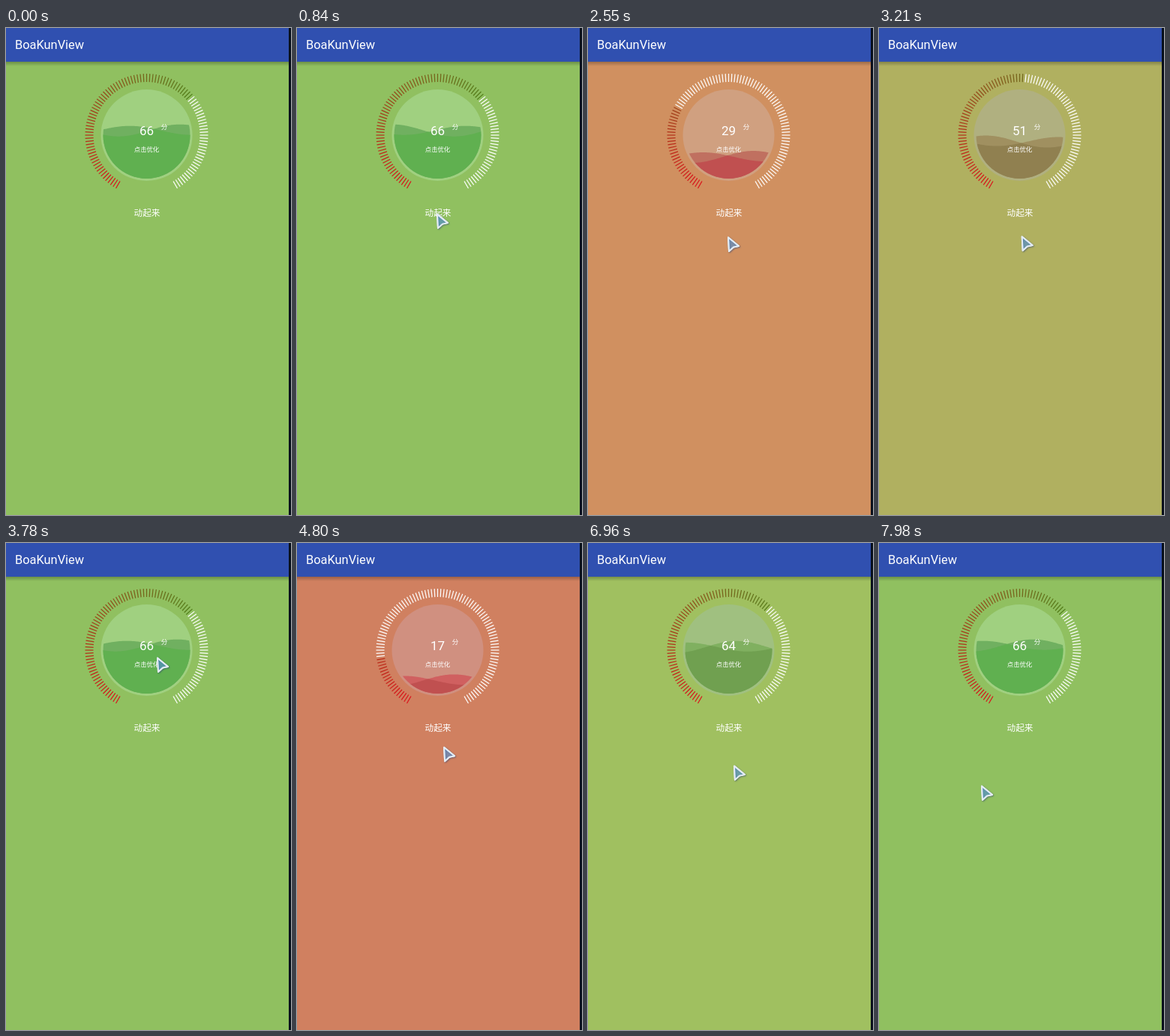
An HTML page with a canvas for the animation above (8 s loop, 380 by 650 pixels).

```html
<!DOCTYPE html>
<html lang="zh">
<head>
<meta charset="utf-8">
<style>
html, body { margin: 0; width: 100%; height: 100%; overflow: hidden; }
canvas { display: block; }
</style>
</head>
<body>
<canvas id="stage" width="380" height="650"></canvas>
<script>
const ctx = document.getElementById('stage').getContext('2d');
const LOOP = 8000, CX = 187.5, CY = 143, FULL = 200 / 3;
const FALL = 720, RISE = 30.6 * FULL, BOTTOMS = [1650, 4990];
const WAVE_LENGTH = 164;

// [time, x, y] of the pointer tip
const POINTER = [
  [30, 50, 200], [510, 186, 247], [840, 186, 247], [1470, 167, 332],
  [1620, 165, 384], [2430, 184, 289], [2550, 186, 278], [3270, 190, 277],
  [3780, 201, 152], [4290, 201, 152], [5070, 192, 334], [5910, 192, 334],
  [6660, 193, 300], [6960, 194, 296], [7200, 175, 328], [7440, 146, 321],
  [7770, 146, 321], [7980, 136, 323]
];
// [time, wave steps]
const WAVE_STEPS = [[0, 0], [1470, 7], [3780, 19], [5610, 31], [7980, 45]];

function track(keys, t, axis) {
  const i = keys.findIndex(k => k[0] >= t);
  if (i < 0) return keys[keys.length - 1][axis];
  if (i === 0) return keys[0][axis];
  const a = keys[i - 1], b = keys[i];
  return a[axis] + (b[axis] - a[axis]) * (t - a[0]) / (b[0] - a[0]);
}

function scoreAt(t) {
  for (const zero of BOTTOMS) {
    const d = t - zero;
    if (d >= -FALL && d < 0) return -d / FALL * FULL;
    if (d >= 0 && d < RISE) return d / RISE * FULL;
  }
  return FULL;
}

const mix = (a, b, k) => a.map((v, i) => v + (b[i] - v) * k);
// colours move in coarse steps of 16
const css = c => `rgb(${c.map(v => Math.floor(v / 16) * 16)})`;

function palette(score) {
  const red = 255 * (1 - score / 100), green = 255 * score / 100;
  const back = mix([255, 255, 255], [red, green, 0], 0.588);
  const disc = [
    back[0] + (255 - back[0]) * 0.05,
    back[1] + (255 - back[1]) * 0.15,
    134
  ];
  const water = [red, green - 8, 64];
  const single = mix(disc, water, 0.45);
  return { back, disc, single, both: mix(single, water, 0.45) };
}

function circle(r) {
  ctx.beginPath();
  ctx.arc(CX, CY, r, 0, 2 * Math.PI);
}

function text(str, x, y, size, family, align = 'center') {
  ctx.font = `${size}px ${family}, sans-serif`;
  ctx.textAlign = align;
  ctx.fillStyle = '#fff';
  ctx.fillText(str, x, y);
}

function fillBelow(surface, colour) {
  ctx.beginPath();
  ctx.moveTo(125, 210);
  for (let x = 125; x <= 250; x++) ctx.lineTo(x, surface(x));
  ctx.lineTo(250, 210);
  ctx.fillStyle = css(colour);
  ctx.fill();
}

function drawWater(t, score, colours) {
  const level = 200 - 0.95 * score;
  const steps = Math.floor(track(WAVE_STEPS, t, 1) + 0.4);
  const wave = (height, crest) => x =>
    level - height * Math.cos((x - crest) * 2 * Math.PI / WAVE_LENGTH + steps);
  const a = wave(6, 165), b = wave(8, 232);
  ctx.save();
  circle(58);
  ctx.clip();
  fillBelow(x => Math.min(a(x), b(x)), colours.single);
  fillBelow(x => Math.max(a(x), b(x)), colours.both);
  ctx.restore();
}

function drawTicks(score) {
  ctx.lineWidth = 1.2;
  for (let i = 0; i <= 100; i++) {
    const p = i / 100, angle = (120 + 3 * i) * Math.PI / 180;
    const c = Math.cos(angle), s = Math.sin(angle);
    ctx.strokeStyle = i <= score
      ? `rgb(${220 - 210 * p}, ${16 + 165 * p}, 25)` : '#fff';
    ctx.beginPath();
    ctx.moveTo(CX + 71 * c, CY + 71 * s);
    ctx.lineTo(CX + 82 * c, CY + 82 * s);
    ctx.stroke();
  }
}

function drawPointer(x, y) {
  ctx.save();
  ctx.translate(x, y);
  ctx.beginPath();
  ctx.moveTo(1, 1.5);
  ctx.lineTo(15, 13);
  ctx.lineTo(8, 14.5);
  ctx.lineTo(2, 20);
  ctx.closePath();
  ctx.lineJoin = 'round';
  ctx.lineWidth = 2;
  ctx.strokeStyle = '#e4ecf4';
  ctx.shadowColor = 'rgba(40, 60, 110, 0.6)';
  ctx.shadowBlur = 2;
  ctx.shadowOffsetX = ctx.shadowOffsetY = 1;
  ctx.stroke();
  ctx.shadowColor = 'transparent';
  ctx.fillStyle = 'rgba(80, 140, 205, 0.65)';
  ctx.fill();
  ctx.stroke();
  ctx.restore();
}

function drawHeader() {
  ctx.fillStyle = '#3050b0';
  ctx.fillRect(0, 0, 377, 45);
  const shade = ctx.createLinearGradient(0, 45, 0, 51);
  shade.addColorStop(0, 'rgba(0, 0, 0, 0.25)');
  shade.addColorStop(1, 'rgba(0, 0, 0, 0)');
  ctx.fillStyle = shade;
  ctx.fillRect(0, 45, 377, 6);
  text('BoaKunView', 12, 28, 16.4, 'Roboto', 'left');
}

function draw(t) {
  const score = scoreAt(t);
  const colours = palette(scoreAt(t - 70)); // colour trails the needle
  const cjk = '"Noto Sans CJK SC", "Noto Sans CJK"';

  ctx.fillStyle = css(colours.back);
  ctx.fillRect(0, 0, 380, 650);
  drawHeader();
  ctx.fillStyle = '#08101c';
  ctx.fillRect(377, 0, 3, 650);

  drawTicks(score);
  circle(61);
  ctx.fillStyle = css(colours.disc);
  ctx.fill();
  drawWater(t, score, colours);

  text(Math.floor(score), CX, 143, 17, 'Roboto');
  text('分', 211, 134.5, 8.5, cjk);
  text('点击优化', CX, 165, 8.4, cjk);
  text('动起来', 188, 250.5, 11.6, cjk);

  if (t >= 30) drawPointer(track(POINTER, t, 1), track(POINTER, t, 2));
}

const start = performance.now();
function frame() {
  draw((performance.now() - start) % LOOP);
  requestAnimationFrame(frame);
}
frame();
</script>
</body>
</html>
```
